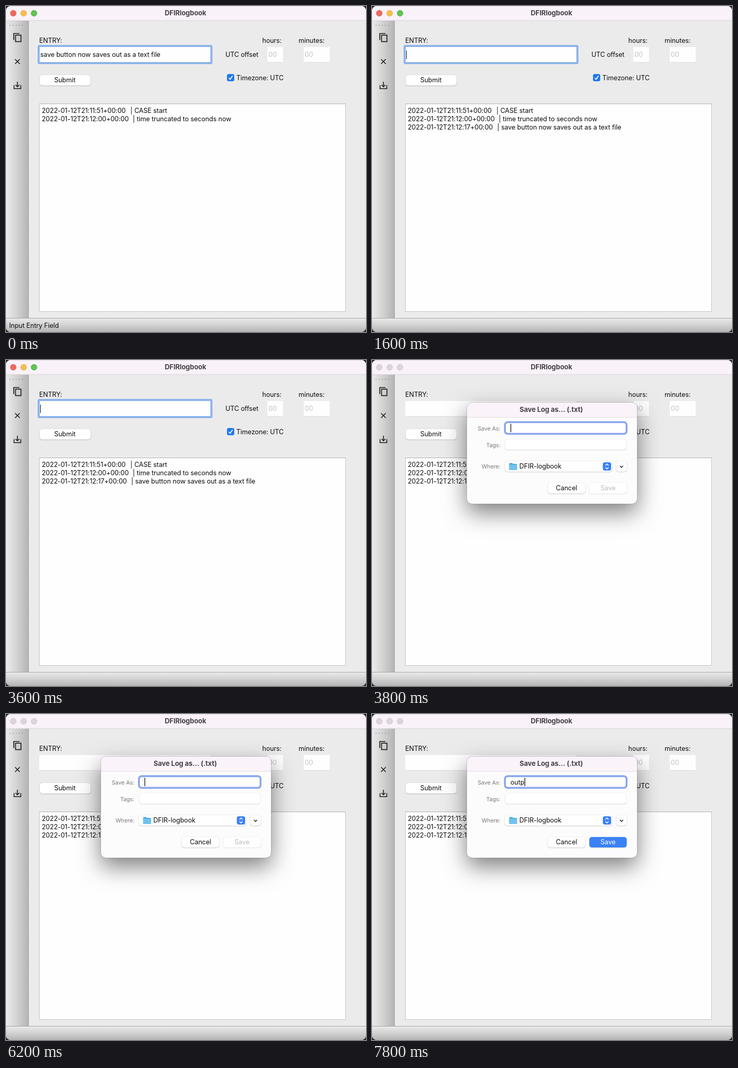
Animation, 694 px wide and 628 px high, one loop 8 s. Source, as an HTML page with a canvas:

```html
<!DOCTYPE html>
<html lang="en">
<head>
<meta charset="utf-8">
<title>DFIRlogbook</title>
<style>
html, body { margin: 0; width: 100%; height: 100%; overflow: hidden; background: #2b2a2b; }
canvas { display: block; }
</style>
</head>
<body>
<canvas id="stage" width="694" height="628"></canvas>
<script>
const g = document.getElementById('stage').getContext('2d');
const LOOP = 8000, SUBMIT = 1600, DIALOG = 3800;
const ENTRY = 'save button now saves out as a text file';
const KEYS = [6800, 7000, 7400, 7600];
const FILE = 'outp';
const BLUE = '#3b82f6';

function text(str, x, y, { size = 12.6, weight = 400, color = '#0c0c0c', align = 'left' } = {}) {
  g.font = `${weight} ${size}px Inter, sans-serif`;
  g.letterSpacing = '-0.06px';
  g.textAlign = align;
  g.fillStyle = color;
  g.fillText(str, x, y);
  return g.measureText(str).width;
}

function rect(x, y, w, h, color) {
  g.fillStyle = color;
  g.fillRect(x, y, w, h);
}

function box(x, y, w, h, r, color) {
  g.beginPath();
  g.roundRect(x, y, w, h, r);
  g.fillStyle = color;
  g.fill();
}

function line(points, color = '#1c1c1c', width = 1.6) {
  g.beginPath();
  points.forEach(([x, y]) => g.lineTo(x, y));
  g.strokeStyle = color;
  g.lineWidth = width;
  g.stroke();
}

function shadow(color, blur, dy) {
  g.shadowColor = color;
  g.shadowBlur = blur;
  g.shadowOffsetY = dy;
}

function button(x, y, w, h, color = '#fff', alpha = 0.28) {
  g.save();
  shadow(`rgba(0,0,0,${alpha})`, 2, 0.6);
  box(x, y, w, h, 5, color);
  g.restore();
}

function gradient(x0, y0, x1, y1) {
  const fill = g.createLinearGradient(x0, y0, x1, y1);
  [[0, 235], [0.5, 210], [0.75, 195], [1, 180]].forEach(([at, v]) =>
    fill.addColorStop(at, `rgb(${v},${v},${v})`));
  return fill;
}

function field(x, y, w, h) {
  rect(x, y, w, h, '#fefefe');
  rect(x, y + h - 1, w, 1, '#dedede');
}

function titleBar(active) {
  rect(0, 0, 694, 28, '#f9f2f9');
  rect(0, 0, 694, 1, '#e3dde3');
  rect(0, 27.5, 694, 1, '#d8d3d8');
  const lights = active
    ? [['#ed6a5f', '#d9574c'], ['#f5be4f', '#dea63b'], ['#5fc454', '#4dab42']]
    : Array(3).fill(['#dcd5dc', '#c8c1c8']);
  lights.forEach(([fill, edge], i) => {
    g.beginPath();
    g.arc(14 + i * 20, 14, 5.7, 0, Math.PI * 2);
    g.fillStyle = fill;
    g.fill();
    g.strokeStyle = edge;
    g.lineWidth = 0.7;
    g.stroke();
  });
  text('DFIRlogbook', 346, 18, { size: 13, weight: 700, color: '#454045', align: 'center' });
}

function toolBar() {
  rect(0, 28, 43, 573, gradient(0, 0, 43, 0));
  rect(43, 28, 1, 573, '#a6a6a6');
  for (let i = 0; i < 5; i++) rect(7 + i * 6, 36.5, 1.5, 1.5, '#858585');
  // copy
  g.strokeStyle = '#1c1c1c';
  g.lineWidth = 1.7;
  g.strokeRect(18.4, 56.2, 10.4, 12.4);
  line([[15, 65.5], [15, 53], [26, 53]], '#1c1c1c', 1.7);
  // clear
  line([[17.5, 102.5], [26.5, 111.5]]);
  line([[26.5, 102.5], [17.5, 111.5]]);
  // save
  line([[15.5, 152.5], [15.5, 159.2], [28.5, 159.2], [28.5, 152.5]]);
  line([[22, 146], [22, 155.5]]);
  line([[18.3, 152], [22, 155.7], [25.7, 152]]);
}

function statusBar(t) {
  rect(0, 601, 694, 27, gradient(0, 601, 0, 628));
  rect(0, 601, 694, 1, '#a6a6a6');
  if (t < SUBMIT) text('Input Entry Field', 6, 620);
}

function form(t) {
  text('ENTRY:', 64, 71);
  text('hours:', 494, 71);
  text('minutes:', 564, 71);
  text('UTC offset', 423, 98);
  [[504, 30], [574, 50]].forEach(([x, w]) => {
    field(x, 79, w, 30);
    text('00', x + 2, 98, { color: '#c2c2c2' });
  });

  const focused = t < DIALOG;
  if (focused) {
    box(61, 75, 337, 37, 3.5, '#8eb4ea');
    rect(65, 79, 329, 29, '#fefefe');
    const width = t < SUBMIT ? text(ENTRY, 66, 98) : 0;
    if (t % 1000 >= 500) rect(66 + Math.round(width), 86, 1, 16, '#000');
  } else {
    field(64, 79, 330, 30);
  }

  button(65, 133, 98, 20);
  text('Submit', 113.5, 147, { align: 'center' });
  box(426, 131, 14, 14, 3.5, '#1f78f0');
  line([[429.5, 138.5], [432, 141.3], [436.7, 134.4]], '#fff', 1.8);
  text('Timezone: UTC', 444, 143);
}

function log(t) {
  rect(64, 188, 591, 401, '#c6c6c6');
  rect(64, 188, 591, 1, '#b0b0b0');
  rect(65, 189, 589, 399, '#fefefe');
  const rows = [
    ['2022-01-12T21:11:51+00:00', 239.8, 'CASE start'],
    ['2022-01-12T21:12:00+00:00', 244.3, 'time truncated to seconds now'],
    ['2022-01-12T21:12:17+00:00', 241.3, ENTRY]
  ];
  rows.slice(0, t < SUBMIT ? 2 : 3).forEach(([stamp, x, note], i) => {
    text(stamp, 69, 205.6 + i * 16);
    text('| ' + note, x, 205.6 + i * 16);
  });
}

function dialog(t) {
  g.save();
  shadow('rgba(0,0,0,0.5)', 44, 17);
  box(183, 82, 328, 195, 10, '#fdfcfd');
  g.restore();
  box(183, 82, 328, 28, [10, 10, 0, 0], '#faf3fa');
  rect(183, 110, 328, 1, '#e2dde2');
  g.beginPath();
  g.roundRect(182.7, 81.7, 328.6, 195.6, 10);
  g.strokeStyle = 'rgba(0,0,0,0.25)';
  g.lineWidth = 0.6;
  g.stroke();
  text('Save Log as… (.txt)', 345.5, 100, { size: 13, weight: 700, color: '#454045', align: 'center' });

  [['Save As:', 136], ['Tags:', 168], ['Where:', 209]].forEach(([label, y]) =>
    text(label, 247.5, y, { size: 10.8, color: '#7b797b', align: 'right' }));

  box(254.5, 118, 238, 26, 7, '#87a5ed');
  box(258, 121.5, 231, 19, 4, '#fff');
  const typed = FILE.slice(0, KEYS.filter(k => t >= k).length);
  const width = typed ? text(typed, 267, 136) : 0;
  if (typed || (t - DIALOG) % 1000 < 500) rect(267 + Math.round(width), 123, 1.2, 16, '#000');

  button(257, 153, 233, 20, '#fff', 0.22);

  button(256, 195, 207, 20);
  box(264.5, 198.5, 7, 5, 1.5, '#4aa5d8');
  box(264.5, 200, 15, 12, 1.5, '#55b0e0');
  box(264.5, 202, 15, 10, 1.5, '#70c3ee');
  text('DFIR-logbook', 284, 209);
  box(445, 197, 16, 16, 4, BLUE);
  line([[450, 203.2], [453, 200.2], [456, 203.2]], '#fff', 1.5);
  line([[450, 207], [453, 210], [456, 207]], '#fff', 1.5);
  button(471, 195, 20, 20);
  line([[478, 204], [481, 207], [484, 204]], '#1c1c1c', 1.5);

  button(339, 237, 72, 20);
  text('Cancel', 375, 251, { align: 'center' });
  button(419, 237, 72, 20, typed ? BLUE : '#fefefe', typed ? 0.28 : 0.15);
  text('Save', 455, 251, { color: typed ? '#fff' : '#bdbbbd', align: 'center' });
}

function draw(now) {
  const t = now % LOOP;
  rect(0, 0, 694, 628, '#2b2a2b');
  g.save();
  g.beginPath();
  g.roundRect(0, 0, 694, 628, 9);
  g.clip();
  rect(0, 0, 694, 628, '#ecebec');
  toolBar();
  titleBar(t < DIALOG);
  statusBar(t);
  form(t);
  log(t);
  if (t >= DIALOG) dialog(t);
  g.restore();
}

const start = performance.now();
function tick() {
  draw(performance.now() - start);
  requestAnimationFrame(tick);
}
tick();
</script>
</body>
</html>
```
